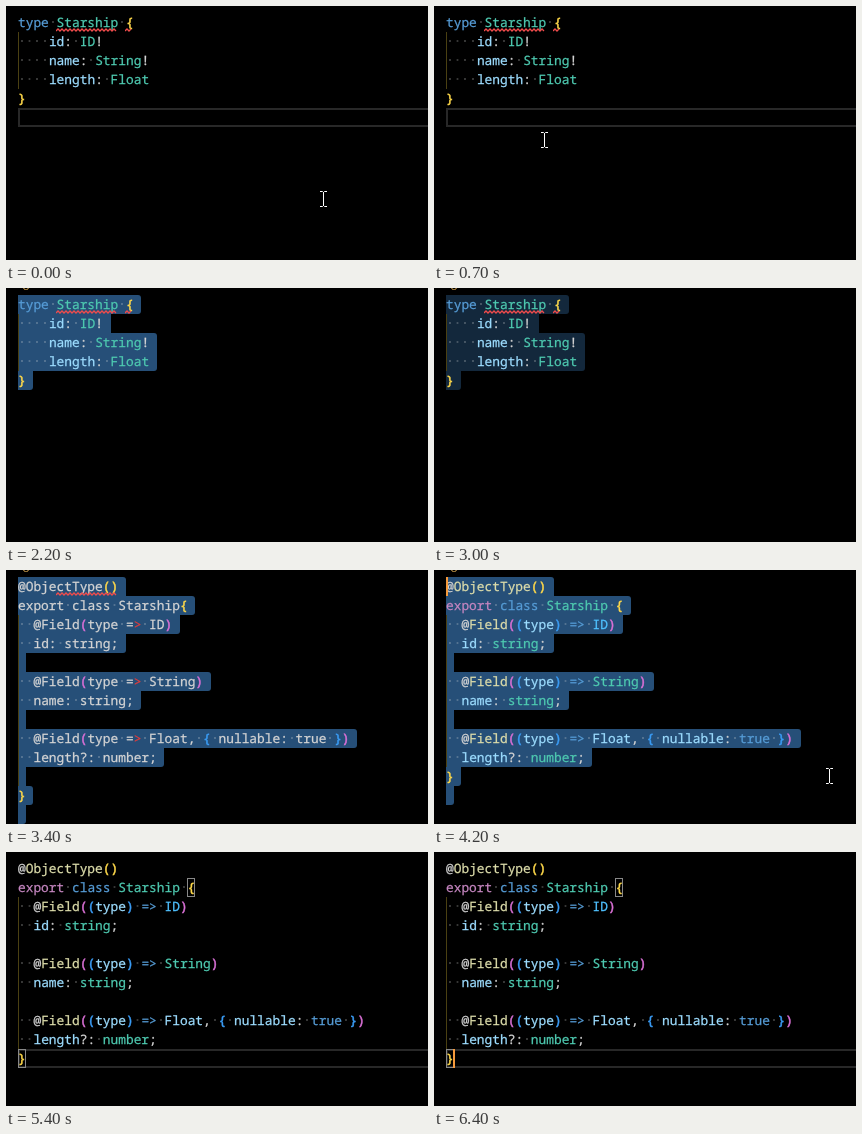
Recreate the animation shown at these times as an HTML page. Size 422 px wide and 254 px high, loop 6.6 s.

```html
<!DOCTYPE html>
<html lang="en">
<head>
<meta charset="utf-8">
<title>Schema to class</title>
<style>
  html, body { margin: 0; width: 100%; height: 100%; overflow: hidden; background: #000; }
  #stage {
    position: relative; width: 422px; height: 254px; overflow: hidden; background: #000;
    color: #d4d4d4; font: 12.85px/19px "Noto Sans Mono", "DejaVu Sans Mono", monospace;
    text-rendering: geometricPrecision; font-variant-ligatures: none;
    -webkit-text-stroke: .25px currentColor;
  }
  #stage div, #stage svg { position: absolute; box-sizing: border-box; }
  .line { left: 12px; white-space: pre; }
  .line i {
    font-style: normal;
    background: radial-gradient(circle, rgba(227, 228, 226, .24) .8px, transparent 1.3px) center no-repeat;
  }
  .b { color: #569cd6 } .t { color: #4ec9b0 } .v { color: #9cdcfe } .f { color: #dcdcaa }
  .k { color: #c586c0 } .c { color: #4fc1ff } .y { color: #ffd94a } .p { color: #da70d6 }
  .n { color: #3a9cf5 } .r { color: #e03c3c }
  .y, .p, .n { -webkit-text-stroke-width: .5px; }
  .current { left: 12px; width: 420px; height: 19px; border: 2px solid #282828; }
  .match { width: 8px; height: 19px; border: 1px solid #888; }
  .guide { left: 12px; width: 1px; background: #4a4012; }
  .active { background: #e8c53c; }
  .caret { width: 2px; height: 19px; background: #f59a3c; }
  .tail { left: 17px; top: -3px; width: 6px; height: 5px; border: 1px solid #c79a4a; border-radius: 3px; }
</style>
</head>
<body>
<div id="stage"></div>
<script>
const LOOP = 6600, STEP = 100, BLINK = 900;
const LEFT = 12, TOP = 7, CHAR = 7.71, ROW = 19;
const x = col => LEFT + col * CHAR;
const y = row => TOP + row * ROW;

// Coloured tokens are written as [class text].
const schema = `[b type] [t Starship] [y {]
    [v id]: [t ID]!
    [v name]: [t String]!
    [v length]: [t Float]
[y }]`.split("\n");

const pasted = `@ObjectType[y ()]
export class Starship[y {]
  @Field[p (]type =[r >] ID[p )]
  id: string;

  @Field[p (]type =[r >] String[p )]
  name: string;

  @Field[p (]type =[r >] Float, [n {] nullable: true [n }][p )]
  length?: number;

[y }]
`.split("\n");

const classCode = (gap, param, blank) => `@[f ObjectType][y ()]
[k export] [b class] [t Starship]${gap}[y {]
  @[f Field][p (]${param} [b =>] [c ID][p )]
  [v id]: [t string];

  @[f Field][p (]${param} [b =>] [t String][p )]
  [v name]: [t string];

  @[f Field][p (]${param} [b =>] [v Float], [n {] [v nullable]: [b true] [n }][p )]
  [v length]?: [t number];
${blank}[y }]
`.split("\n");
const coloured = classCode("", "[v type]", "\n");
const formatted = classCode(" ", "[n (][v type][n )]", "");

const ACTIVE = "#264f78", INACTIVE = "#13283c";
const HOME = [0, 0];

// Each scene holds until the next one starts; its caret blinks from that moment.
const scenes = [
  { start: 0, doc: schema, current: 5 },
  { start: 1200, doc: schema, drag: true },
  { start: 1500, doc: schema, from: HOME, caret: HOME },
  { start: 3000, doc: schema, from: HOME, fill: INACTIVE },
  { start: 3400, doc: pasted, from: HOME, stale: true },
  { start: 3500, doc: coloured, from: HOME },
  { start: 3800, doc: formatted, from: HOME, caret: HOME },
  { start: 4600, doc: formatted, current: 10, caret: [10, 1], match: [[1, 22], [10, 0]] }
];

// The pointer glides to each stop and rests there until the next glide.
const glides = [
  { start: 0, end: 300, to: [12, 16] },
  { start: 300, end: 500, to: [130, 145] },
  { start: 600, end: 800, to: [90, 123] },
  { start: 900, end: 1000, to: [16, 122] },
  { start: 1100, end: 1300, to: [31, 39] },
  { start: 1300, end: 1500, to: [8, 4] },
  { start: 1900, end: 2100, to: [285, 119] },
  { start: 3900, end: 4200, to: [395, 206] },
  { start: 4600, end: 5000, to: [398, 240] }
];
const pointerShown = t => t < 2200 || (t >= 4000 && t < 5200);

function pointerAt(t) {
  let spot = [317, 193];
  for (const { start, end, to } of glides) {
    const p = Math.min(1, Math.max(0, (t - start) / (end - start)));
    spot = spot.map((v, i) => v + (to[i] - v) * p);
  }
  return spot.map(Math.round);
}

const TOKEN = /\[(\w) ([^\]]+)\]/g;
const plain = line => line.replace(TOKEN, "$2");
const box = (name, style) => `<div class="${name}" style="${style}"></div>`;
const cellBox = (name, [row, col]) =>
  box(name, `left:${Math.floor(x(col))}px;top:${y(row)}px`);

function textLine(line, row) {
  const html = line.replace(/>/g, "&gt;")
    .replace(/ (?![^\[\]]*\])/g, "<i>\u00a0</i>")
    .replace(TOKEN, '<span class="$1">$2</span>');
  return `<div class="line" style="top:${y(row)}px">${html}</div>`;
}

function selection(doc, [firstRow, firstCol], fill = ACTIVE) {
  const ends = doc.map((line, row) => row < firstRow ? 0 : x(plain(line).length + 1));
  return ends.map((end, row) => {
    if (!end) return "";
    const left = row === firstRow ? x(firstCol) : LEFT;
    const round = other => end > (ends[other] || 0) ? 3 : 0;
    const inset = row === firstRow && firstCol ? 3 : 0;
    return box("", `left:${left}px;top:${y(row)}px;width:${end - left}px;height:${ROW}px;` +
      `background:${fill};border-radius:${inset}px ${round(row - 1)}px ${round(row + 1)}px 0`);
  }).join("");
}

function guide(doc, active) {
  const first = doc === schema ? 1 : 2;
  const last = doc.findLastIndex(line => line === "[y }]");
  const name = active ? "guide active" : "guide";
  const side = box(name, `top:${y(first)}px;height:${(last - first) * ROW}px`);
  return side + (active ? box(name, `top:${y(1) - 1}px;width:${15 * CHAR}px;height:1px`) : "");
}

function squiggle(col, count) {
  const width = count * CHAR;
  let path = "M0 3";
  for (let i = 1; i * 2 <= width; i++) path += `L${i * 2} ${i % 2 ? 1 : 3}`;
  return `<svg style="left:${Math.floor(x(col))}px;top:22px" width="${width}" height="4">
    <path d="${path}" fill="none" stroke="#f14c4c" stroke-width="1.3"/></svg>`;
}

const pointer = ([px, py]) => `<svg style="left:${px - 4}px;top:${py - 8}px" width="8" height="16">
  <path d="M1 .5H3.5L4.5 1.5L5.5 .5H8M4.5 1V15M1 15.5H3.5L4.5 14.5L5.5 15.5H8"
    fill="none" stroke="#fff"/></svg>`;

function view(t) {
  const scene = scenes.findLast(({ start }) => start <= t);
  const { start, doc, current, drag, fill, stale, match = [] } = scene;
  const spot = pointerAt(t);
  let { from, caret } = scene;
  if (drag) {
    // The selection reaches the pointer; the caret trails one row behind.
    const row = Math.max(0, Math.floor((spot[1] - TOP) / ROW));
    const col = Math.max(0, Math.ceil((spot[0] - LEFT) / CHAR));
    from = [row, col];
    caret = [row + 1, col];
  }
  const caretLit = caret && (t - start) % BLINK < 500;
  return [
    current ? box("current", `top:${y(current)}px`) : "",
    from ? selection(doc, from, fill) : "",
    guide(doc, drag),
    ...match.map(cell => cellBox("match", cell)),
    ...doc.map(textLine),
    doc === schema || stale ? squiggle(5, 8) : "",
    doc === schema ? squiggle(14, 1) : "",
    t >= 1700 && t < 5000 ? box("tail", "") : "",
    caretLit ? cellBox("caret", caret) : "",
    pointerShown(t) ? pointer(spot) : ""
  ].join("");
}

const stage = document.getElementById("stage");
const began = performance.now();
let shown = -1;
function tick() {
  const elapsed = Math.max(0, performance.now() - began) % LOOP;
  const t = Math.floor(elapsed / STEP) * STEP;
  if (t !== shown) {
    stage.innerHTML = view(t);
    shown = t;
  }
  requestAnimationFrame(tick);
}
tick();
</script>
</body>
</html>
```
